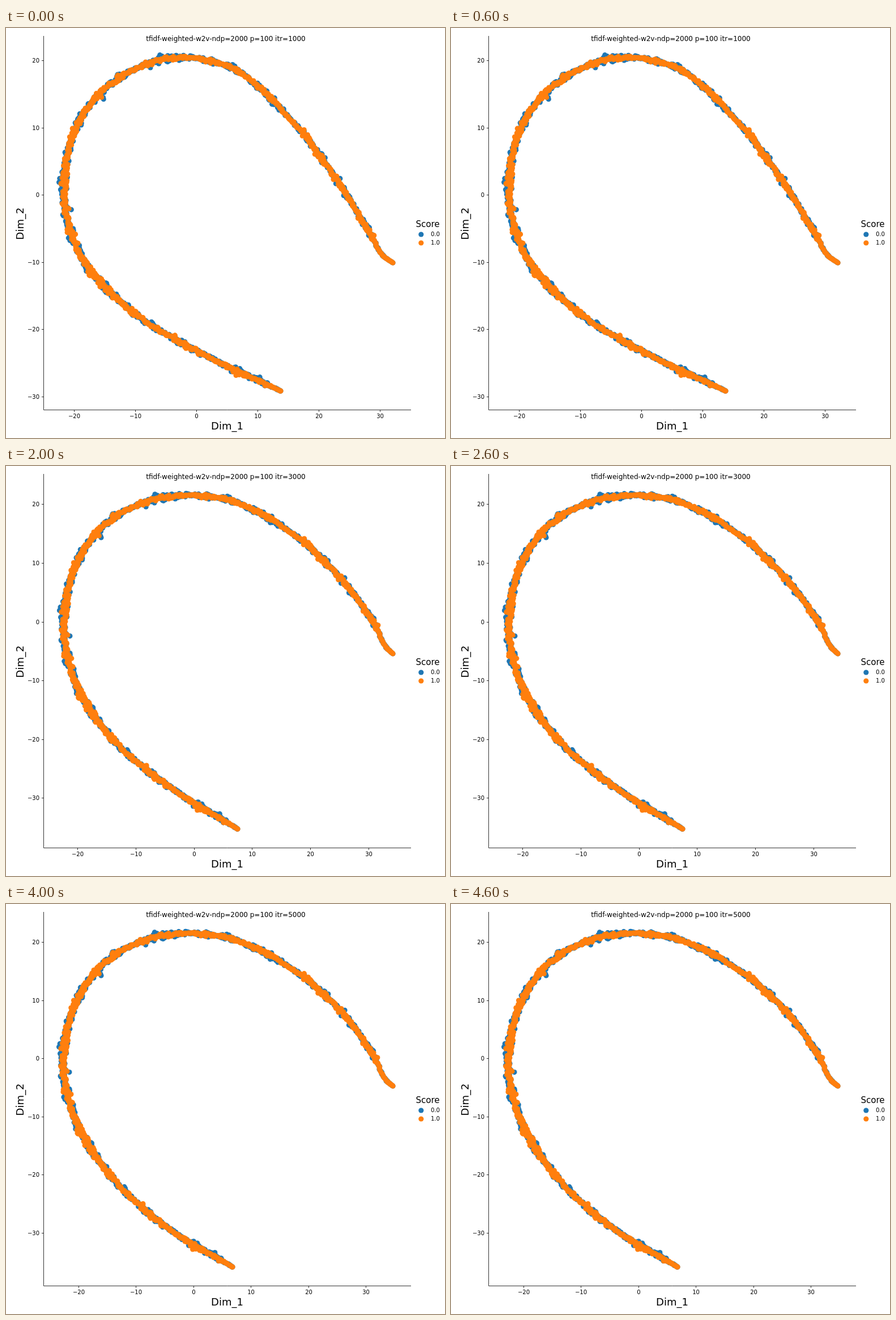
Write an HTML page with a canvas that moves like this. It is 775 px wide and 723 px high and loops after 5 s.

```html
<!DOCTYPE html>
<html lang="en">
<head>
<meta charset="utf-8">
<title>Embedding scatter</title>
<style>
  html, body { margin: 0; width: 100%; height: 100%; overflow: hidden; background: #fff; }
  canvas { display: block; }
</style>
</head>
<body>
<canvas id="stage" width="775" height="723"></canvas>
<script>
(() => {
  const ctx = document.getElementById('stage').getContext('2d');
  const BLUE = '#1f77b4', ORANGE = '#ff7f0e';
  const STEP = 1000, STEPS = 5, DOT = 4.6;

  // Each view: pixel of the data zero, pixels per 10 units, key points of the band
  const views = [
    { x0: 336, y0: 294.5, dx: 108, dy: 118.5, line: [
      683,414, 667,403, 646,368, 590,277, 502,161, 388,66, 318,52,
      180,102, 136,153, 102,287, 131,400, 213,492, 357,580, 485,640] },
    { x0: 337.5, y0: 279.5, dx: 107.5, dy: 107.9, line: [
      683,371, 677,357, 658,316, 605,236, 511,134, 388,61, 318,52,
      175,104, 135,150, 102,273, 125,381, 193,475, 325,573, 447,640] },
    { x0: 332, y0: 275, dx: 102.7, dy: 103.6, line: [
      683,331, 673,322, 653,283, 599,208, 501,116, 380,57, 311,52,
      172,105, 137,149, 102,269, 119,373, 178,470, 296,571, 409,640] },
    { x0: 331, y0: 272.5, dx: 101.5, dy: 102.5, line: [
      683,321, 674,314, 652,273, 599,198, 501,112, 379,57, 310,52,
      172,105, 137,149, 101,266, 118,369, 174,466, 289,574, 400,640] }
  ];

  // Smooth curve through the key points; u counts points, off runs along the normal
  function makeCurve(line) {
    const last = line.length / 2 - 1;
    const pts = Array.from({ length: last + 1 }, (_, i) => ({ x: line[2 * i], y: line[2 * i + 1] }));
    const len = pts.slice(1).map((p, i) => Math.hypot(p.x - pts[i].x, p.y - pts[i].y));
    const slope = (i, k) => (pts[i + 1][k] - pts[i][k]) / len[i];
    const tangent = (i, k) => {
      if (i === 0) return slope(0, k);
      if (i === last) return slope(last - 1, k);
      return (slope(i - 1, k) * len[i] + slope(i, k) * len[i - 1]) / (len[i - 1] + len[i]);
    };
    const tan = pts.map((_, i) => ({ x: tangent(i, 'x'), y: tangent(i, 'y') }));
    const at = (u, off) => {
      const i = Math.min(last - 1, Math.floor(u)), t = u - i, s = 1 - t;
      const a = pts[i], b = pts[i + 1], ta = tan[i], tb = tan[i + 1];
      const pos = k => a[k] * s * s * (1 + 2 * t) + b[k] * t * t * (3 - 2 * t)
        + len[i] * (ta[k] * t * s * s - tb[k] * t * t * s);
      const dx = ta.x * s + tb.x * t, dy = ta.y * s + tb.y * t, d = Math.hypot(dx, dy);
      return [pos('x') - dy / d * off, pos('y') + dx / d * off];
    };
    return { len, at };
  }

  for (const v of views) v.curve = makeCurve(v.line);

  let seed = 2000;
  function rand() {
    seed = (seed * 1664525 + 1013904223) % 4294967296;
    return seed / 4294967296;
  }

  const { len } = views[0].curve;
  const total = len.reduce((a, b) => a + b);

  // Half width of the band at distance s: clumps, wider at the left, thin at the tips
  function spread(s) {
    const clump = 0.5 + 0.5 * Math.sin(s / 11 + 2 * Math.sin(s / 37));
    const left = 1.5 * Math.exp(-(((s - 900) / 170) ** 2));
    const tips = Math.min(1, s / 100, (total - s) / 50 + 0.2);
    return (1.6 + 2.4 * clump + left) * tips;
  }

  // Dots keep their place along the band in every view
  function band(color, pitch, widen) {
    const dots = [];
    let start = 0;
    len.forEach((l, i) => {
      for (let d = 0; d < l; d += pitch) {
        const stray = rand() < 0.05 ? 1.7 : 1;
        const off = (rand() + rand() - 1) * spread(start + d) * widen * stray;
        dots.push({ u: i + d / l, off });
      }
      start += l;
    });
    dots.push({ u: len.length, off: 0 });
    return { color, dots };
  }

  const layers = [band(BLUE, 1.6, 1.8), band(ORANGE, 1.5, 1.4)];

  function dot(x, y, color) {
    ctx.fillStyle = color;
    ctx.beginPath();
    ctx.arc(x, y, DOT, 0, 7);
    ctx.fill();
  }

  function label(text, x, y, size, align) {
    ctx.fillStyle = '#000';
    ctx.font = size + 'px "DejaVu Sans", sans-serif';
    ctx.textAlign = align;
    ctx.fillText(text, x, y);
  }

  function rule(x1, y1, x2, y2) {
    ctx.beginPath();
    ctx.moveTo(x1, y1);
    ctx.lineTo(x2, y2);
    ctx.stroke();
  }

  function axes(v) {
    ctx.strokeStyle = '#000';
    ctx.lineWidth = 0.8;
    rule(66.5, 14, 66.5, 673.5);
    rule(66.5, 673.5, 715, 673.5);
    const snap = n => Math.floor(n) + 0.5;
    for (let n = -3; n <= 3; n++) {
      const text = String(n * 10).replace('-', '\u2212');
      const x = snap(v.x0 + n * v.dx), y = snap(v.y0 - n * v.dy);
      if (n > -3) {
        rule(x, 673.5, x, 677);
        label(text, x, 688, 10, 'center');
      }
      if (n < 3) {
        rule(63, y, 66.5, y);
        label(text, 59, y + 3.5, 10, 'right');
      }
    }
    label('Dim_1', 390.5, 708, 18, 'center');
    ctx.save();
    ctx.translate(31, 345);
    ctx.rotate(-Math.PI / 2);
    label('Dim_2', 0, 0, 18, 'center');
    ctx.restore();
  }

  function legend() {
    label('Score', 744.5, 351, 15, 'center');
    layers.forEach(({ color }, i) => {
      dot(732.8, 364 + 15 * i, color);
      label(i + '.0', 750, 367 + 15 * i, 10, 'left');
    });
  }

  function draw(step) {
    const v = views[Math.min(step, views.length - 1)];
    ctx.fillStyle = '#fff';
    ctx.fillRect(0, 0, 775, 723);
    for (const { color, dots } of layers) {
      for (const { u, off } of dots) dot(...v.curve.at(u, off), color);
    }
    axes(v);
    legend();
    label('tfidf-weighted-w2v-ndp=2000 p=100 itr=' + (step + 1) * 1000, 388, 23, 12, 'center');
  }

  let shown = -1;
  function tick() {
    const step = Math.floor(performance.now() / STEP) % STEPS;
    if (step !== shown) draw(shown = step);
    requestAnimationFrame(tick);
  }
  tick();
})();
</script>
</body>
</html>
```
